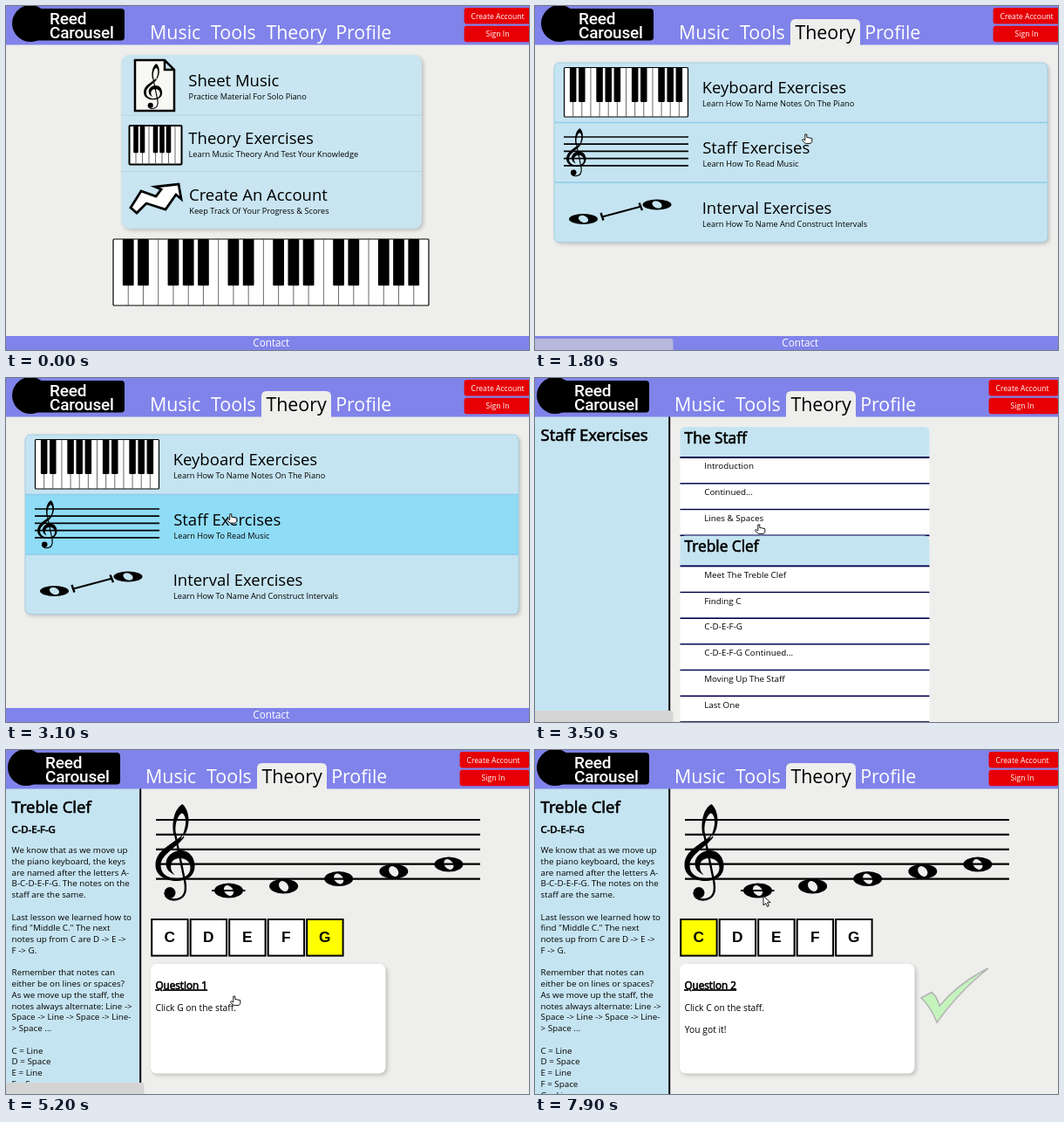
Recreate the animation shown at these times as an HTML page. Size 600 by 394 pixels, loop 8000 ms.

```html
<!DOCTYPE html>
<html lang="en">
<head>
<meta charset="utf-8">
<title>Music lessons</title>
<style>
html, body { margin: 0; width: 100%; height: 100%; overflow: hidden; background: #eeeeec; }
svg { display: block; width: 600px; height: 394px; font-family: "Open Sans", "Noto Sans", sans-serif; }
text { white-space: pre; }
.strong { stroke: #000; stroke-width: .65; }
.card { filter: drop-shadow(2px 2px 2px #0003); }
</style>
</head>
<body>
<svg id="stage" viewBox="0 0 600 394"></svg>
<script>
const LOOP = 8000, PALE = '#c5e4f1', BAR = '#8083e9', NAVY = '#00004e';
const $ = id => document.getElementById(id);
const many = (n, fn) => Array.from({ length: n }, (_, i) => fn(i)).join('');

const rect = (x, y, w, h, fill, more = '') =>
  `<rect x="${x}" y="${y}" width="${w}" height="${h}" fill="${fill}" ${more}/>`;
const line = (x1, y1, x2, y2, width = 1, color = '#000') =>
  `<path d="M${x1} ${y1}L${x2} ${y2}" stroke="${color}" stroke-width="${width}"/>`;
const text = (x, y, size, str, more = '') =>
  `<text x="${x}" y="${y}" font-size="${size}" ${more}>${str.replace(/&/g, '&amp;').replace(/>/g, '&gt;')}</text>`;
const strong = (x, y, size, str, more = '') => text(x, y, size, str, 'class="strong" ' + more);
const at = (x, y, body, scale = 1) => `<g transform="translate(${x} ${y}) scale(${scale})">${body}</g>`;

const clef = `<path d="M31 0C40 8 40 26 33 36L29 40C35 28 36 18 33 13C31 9 29 10 26 15C23 21 22 28 24 36L21 36C18 20 22 5 31 0Z
  M31 35C20 46 0 52 0 70C0 82 12 88 24 88C35 88 45 83 45 71C45 60 38 53 29 53C20 53 12 60 12 68C12 75 17 79 22 81
  C18 77 17 73 18 69C19 64 23 62 28 62C35 62 40 66 40 73C40 81 33 85 25 85C14 85 6 80 6 70C6 58 24 50 33 38Z"/>
  <path d="M22.5 34L34 90Q37 109 21 109.5Q12 109 11 102" fill="none" stroke="#000" stroke-width="2.4"/>
  <circle cx="16.5" cy="101.5" r="6.5"/>`;

const note = (x, y, squash = 1) => `<path transform="translate(${x} ${y}) scale(1 ${squash})" fill-rule="evenodd"
  d="M-16.5 0a16.5 8.6 0 1 0 33 0a16.5 8.6 0 1 0-33 0ZM-4.2-5a6.5 4.8 50 1 0 8.4 10a6.5 4.8 50 1 0-8.4-10Z"/>`;

const staff = (x1, x2, y, gap, width) => many(5, i => line(x1, y + i * gap, x2, y + i * gap, width));

function piano(x, y, w, h, count, border, under = '') {
  const key = w / count;
  const black = i => [0, 1, 3, 4, 5].includes(i % 7) && i < count - 1;
  return rect(x, y, w, h, '#fff', `stroke="#000" stroke-width="${border}" rx="1"`)
    + many(count - 1, i => line(x + (i + 1) * key, y, x + (i + 1) * key, y + h, .8, '#444')) + under
    + many(count, i => black(i) ? rect(x + (i + 1 - .37) * key, y, key * .74, h * .7, '#000', 'rx="1"') : '');
}

const entry = (x, y, title, sub) => text(x, y, 18.5, title) + text(x + .3, y + 15, 9.2, sub);
const hover = (id, x, y, w, h, color) => rect(x, y, w, h, color, `id="${id}" opacity="0"`);

const home = rect(132.4, 56, 344.6, 199, '#c8e5f1', 'rx="9" class="card"')
  + '<path id="h0" opacity="0" fill="#92dcf6" d="M132.4 125V65q0-9 9-9h326.600q9 0 9 9v60z"/>'.replace('.600', '.6')
  + line(132.4, 125, 477, 125, 1, '#b2d3e1') + line(132.4, 189.5, 477, 189.5, 1, '#b2d3e1')
  + '<path d="M148 62h34l11 11v47h-45zM182 62v11h11" fill="#f8f8f4" stroke="#000" stroke-width="2.5"/>'
  + at(158, 66, clef, .47)
  + piano(141.5, 137, 60, 44.5, 8, 2)
  + '<path d="M143 231L155 212L172 218L178 210L171 207L198 204L201 221L195 216L183 233L161 226L150 237Z" fill="#fff" stroke="#000" stroke-width="2.8"/>'
  + entry(209.3, 91.5, 'Sheet Music', 'Practice Material For Solo Piano')
  + entry(209.3, 158, 'Theory Exercises', 'Learn Music Theory And Test Your Knowledge')
  + entry(210, 222.7, 'Create An Account', 'Keep Track Of Your Progress & Scores')
  + piano(123, 267, 362, 76, 21, 1.2, rect(123, 267, 17.24, 76.4, '#fff', 'id="pressed" stroke="#222" stroke-width=".9"'));

const theory = rect(22, 65, 566, 205.5, PALE, 'rx="6" class="card"')
  + hover('k0', 22.5, 65.5, 565, 68, '#8fdcf7') + hover('k1', 22, 134, 566, 68, '#8fdcf7')
  + line(22, 133.5, 588, 133.5, 1.3, '#8fcbe8') + line(22, 202, 588, 202, 1.3, '#8fcbe8')
  + rect(22, 65, 566, 205.5, 'none', 'rx="6" stroke="#a3cfe2"')
  + piano(33.5, 70.5, 142, 56.5, 14, 1.2)
  + staff(33, 176, 150, 8.2, 1.7) + at(36, 140, clef, .5)
  + note(55.5, 244, .7) + note(140, 227.5, .7)
  + line(77, 241.5, 122, 229.5, 2) + line(75.5, 237, 78.5, 245.5, 2.4) + line(119.5, 225.5, 123, 234, 2.4)
  + entry(191.7, 100, 'Keyboard Exercises', 'Learn How To Name Notes On The Piano')
  + entry(192.2, 169, 'Staff Exercises', 'Learn How To Read Music')
  + entry(191.7, 237.5, 'Interval Exercises', 'Learn How To Name And Construct Intervals');

const sidebar = title => rect(0, 44, 154, 350, PALE) + rect(153.2, 44, 2, 350, '#000') + strong(6.6, 72, 18.5, title);
const heading = (y, str) => `<path d="M166.5 ${y + 35}v-29q0-6 6-6h274q6 0 6 6v29z" fill="${PALE}"/>`
  + strong(171.6, y + 18.5, 17.3, str) + rect(166.5, y + 34, 286, 2, NAVY);
const rows = (y, names, id) => names.map((name, i) => {
  const top = y + i * 29.7;
  return rect(166.5, top, 286, 28.2, '#fff') + (id ? hover(id + i, 166.5, top, 286, 28.2, PALE) : '')
    + rect(166.5, top + 28.1, 286, 1.7, NAVY) + text(194.2, top + 12.4, 9.85, name);
}).join('');
const lessons = sidebar('Staff Exercises')
  + heading(56, 'The Staff') + rows(92, ['Introduction', 'Continued...', 'Lines & Spaces'])
  + heading(180.5, 'Treble Clef')
  + rows(216.6, ['Meet The Treble Clef', 'Finding C', 'C-D-E-F-G', 'C-D-E-F-G Continued...', 'Moving Up The Staff', 'Last One'], 'r');

const prose = `We know that as we move up
the piano keyboard, the keys
are named after the letters A-
B-C-D-E-F-G. The notes on the
staff are the same.

Last lesson we learned how to
find "Middle C." The next
notes up from C are D -> E ->
F -> G.

Remember that notes can
either be on lines or spaces?
As we move up the staff, the
notes always alternate: Line ->
Space -> Line -> Space -> Line-
> Space ...

C = Line
D = Space
E = Line
F = Space
G = Line`.split('\n');
const exercise = sidebar('Treble Clef') + strong(6.5, 95, 11.3, 'C-D-E-F-G')
  + prose.map((str, i) => text(6.6, 118 + i * 12.75, 9.8, str)).join('')
  + staff(172, 544, 80, 16.9, 2.2) + at(171.5, 62, clef)
  + line(236, 161, 274.5, 161, 2.2)
  + [161, 156, 147.5, 139, 131].map((y, i) => note(255.5 + i * 63.1, y)).join('')
  + [...'CDEFG'].map((c, i) => rect(167.2 + i * 44.5, 194, 41.4, 41.6, '#fff', `id="b${c}" stroke="#000" stroke-width="2"`)
    + text(187.7 + i * 44.5, 220, 17.3, c, 'text-anchor="middle" font-weight="bold" font-family="Liberation Sans, sans-serif"')).join('')
  + rect(166, 245, 269.5, 125.5, '#fff', 'rx="7" class="card"')
  + strong(171.4, 273.5, 11.7, '', 'id="question" text-decoration="underline"')
  + text(171.5, 299, 10.3, '', 'id="task"') + text(171.8, 323.5, 10.3, 'You got it!', 'id="praise"')
  + '<path id="check" d="M443 284L455 277.5Q461 282 464 293Q487 266 520 250Q487 276 461 312Q454 294 443 284Z" fill="#a5f79a" stroke="#8a8a8a" stroke-width="1.6"/>';

const button = (y, str) => rect(525.6, y, 80, 18.4, '#e60004', 'rx="3"')
  + text(564, y + 12.6, 8.65, str, 'fill="#fff" text-anchor="middle"');
const logoText = (y, str) => text(50, y, 19, str, 'fill="#fff" font-weight="500" font-family="Roboto, sans-serif" letter-spacing="-.2"');
const header = rect(0, 0, 610, 44.5, BAR)
  + rect(28, 3, 108, 36.5, '#000', 'rx="4"') + '<circle cx="28" cy="20" r="21"/>'
  + logoText(20.5, 'Reed') + logoText(36.5, 'Carousel')
  + '<path id="tab" d="M293 45V21q0-6 6-6h68q6 0 6 6v24z" fill="#eeeeec"/>'
  + [[165, 'Music'], [235, 'Tools'], [298.4, 'Theory'], [378.2, 'Profile']]
    .map(([x, str]) => text(x, 38, 21.4, str, `id="nav${str}" fill="#fff"`)).join('')
  + button(2, 'Create Account') + button(22.8, 'Sign In');

const pages = [home, theory, lessons, exercise];
$('stage').innerHTML = rect(0, 0, 600, 394, '#eeeeec')
  + pages.map((body, i) => `<g id="page${i}">${body}</g>`).join('')
  + `<g id="header">${header}</g>`
  + `<g id="footer">${rect(0, 378, 600, 16, BAR)}${text(304.3, 390, 11.7, 'Contact', 'fill="#fff" text-anchor="middle"')}</g>`
  + '<path id="status" d="M0 381h156q2.5 0 2.5 2.5V394H0z" fill="#d4d4d4"/>'
  + `<g id="cursor" fill="#fff" stroke="#000" stroke-width=".9" stroke-linejoin="round">
    <path id="hand" d="M-1.2 0h2v3.4l6 1.2v3.6l-1.5 2.2h-6l-4-3.6 1-1.2 2.5 1.2z"/>
    <path id="arrow" d="M0 0v11l2.6-2.5 1.8 3.9 1.9-.9-1.8-3.8h3.6z"/></g>`;

// Cursor tip: time, x, y
const route = [
  [100, 126, 49], [400, 128, 300], [700, 235, 328], [900, 384, 260], [1100, 351, 78], [1300, 336, 32],
  [1500, 336, 32], [1800, 311, 147], [2300, 311, 147], [2700, 262, 105], [2850, 262, 105], [3200, 257, 168],
  [3600, 257, 168], [4100, 258, 222], [4700, 261, 282], [4800, 261, 282], [4900, 262, 282], [5300, 262, 282],
  [5900, 342, 156], [6200, 461, 130], [6400, 461, 130], [6700, 505, 130], [7250, 505, 130], [7650, 262, 167], [8000, 262, 167]
];
const clamp = v => Math.max(0, Math.min(1, v));
const smooth = v => v * v * (3 - 2 * v);
function cursorAt(t) {
  const i = Math.max(1, route.findIndex(p => p[0] > t));
  const [a, b] = [route[i - 1], route[i]];
  const k = smooth(clamp((t - a[0]) / (b[0] - a[0])));
  return [a[1] + (b[1] - a[1]) * k, a[2] + (b[2] - a[2]) * k];
}
const pulse = (t, from, to, fade = 150) => Math.min(clamp((t - from) / fade), clamp((to + fade - t) / fade));
const show = (id, on) => $(id).style.display = on ? '' : 'none';
const alpha = (id, v) => $(id).setAttribute('opacity', v);

// Row highlights: id, start, end
const hovers = [
  ['h0', 1040, 1150], ['k1', 1850, 2420], ['k0', 2450, 2900], ['k1', 2950, 3400],
  ['r0', 4050, 4200], ['r1', 4250, 4420], ['r2', 4450, 5100]
];

function draw() {
  const t = performance.now() % LOOP;
  const page = t < 1450 ? 0 : t < 3300 ? 1 : t < 5100 ? 2 : 3;
  pages.forEach((_, i) => show('page' + i, i === page));
  show('footer', page < 2);
  $('header').setAttribute('transform', `translate(${page < 2 ? 0 : -5} 0)`);
  show('tab', t >= 1250);
  $('navTheory').setAttribute('fill', t >= 1250 ? '#000' : '#fff');

  const [x, y] = cursorAt(t);
  $('cursor').setAttribute('transform', `translate(${x} ${y})`);
  show('cursor', t >= 100);
  const pointing = t >= 950 && t < 5500;
  show('hand', pointing);
  show('arrow', !pointing);

  const key = t < 700 ? Math.floor((x - 123) / 17.24) : 6;
  show('pressed', t >= 350 && t < 1200);
  $('pressed').setAttribute('x', 123 + key * 17.24);

  const glow = {};
  for (const [id, from, to] of hovers) glow[id] = Math.max(glow[id] || 0, pulse(t, from, to));
  for (const id in glow) alpha(id, glow[id]);
  alpha('status', Math.max(pulse(t, 1550, 1830, 60) * .65, pulse(t, 3380, 3900, 80), pulse(t, 5100, 5500, 80)));

  const second = t >= 7300;
  $('bC').setAttribute('fill', second ? '#ff0' : '#fff');
  $('bG').setAttribute('fill', second ? '#fff' : '#ff0');
  $('question').textContent = second ? 'Question 2' : 'Question 1';
  $('task').textContent = second ? 'Click C on the staff.' : 'Click G on the staff.';
  show('praise', t >= 6850 && !second || t >= 7650);
  alpha('check', Math.max(pulse(t, 6850, 7050, 250), clamp((t - 7700) / 350)));
  requestAnimationFrame(draw);
}
draw();
</script>
</body>
</html>
```
